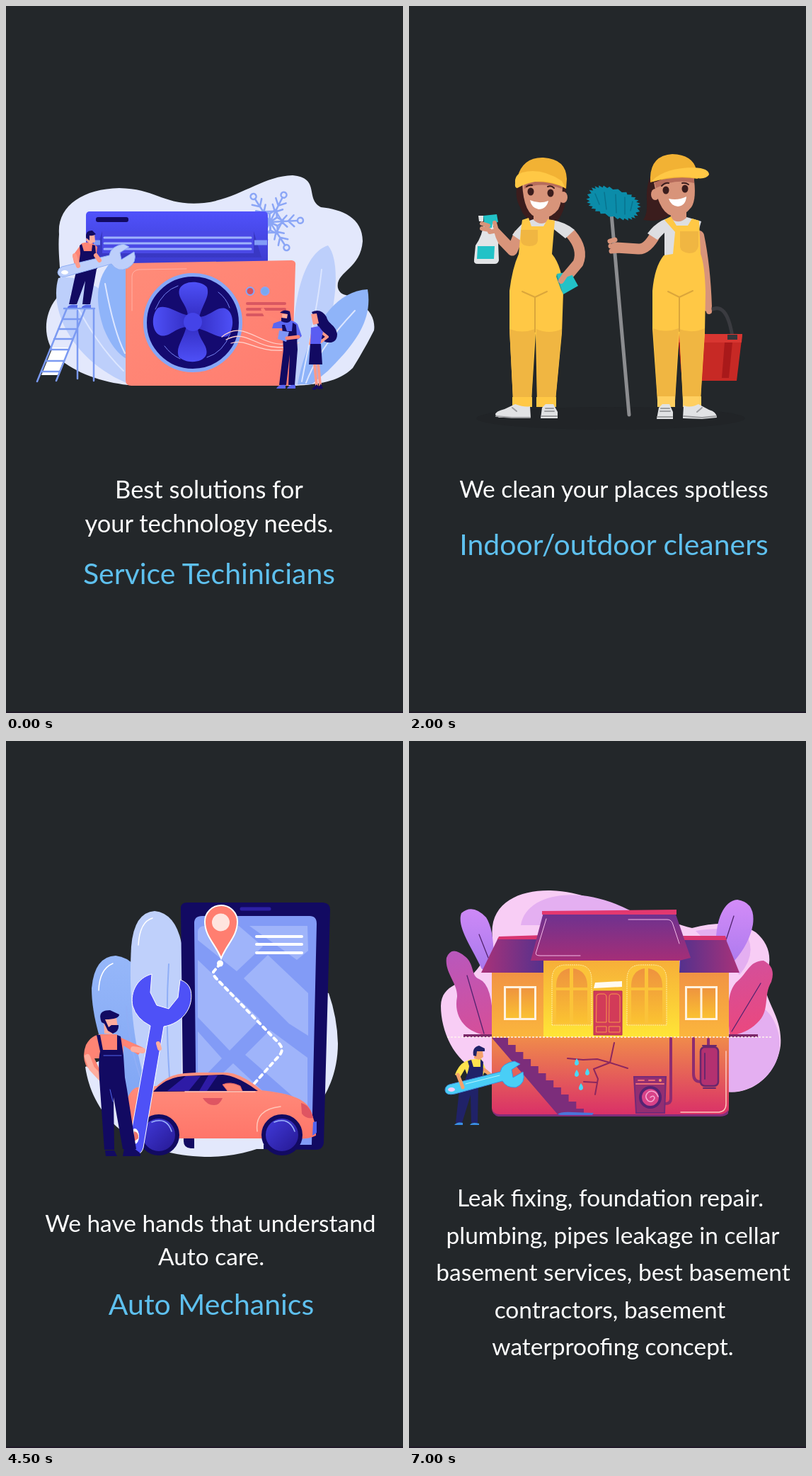
Animation of 561 by 998 pixels, one loop 8 s. Source, as an HTML page:

```html
<!DOCTYPE html>
<html lang="en">
<head>
<meta charset="utf-8">
<title>Home services</title>
<style>
html, body { margin: 0; width: 100%; height: 100%; overflow: hidden; background: #23272a; }
svg { display: block; width: 100%; height: 100%; }
.scene { opacity: 0; }
.scene:first-of-type { opacity: 1; }
text { font: 33.5px Lato, "Open Sans", sans-serif; fill: #fff; text-anchor: middle; }
.mid { font-size: 34.5px; }
.big { font-size: 41px; fill: #5ec0ee; }
.ln { fill: none; stroke-linecap: round; stroke-linejoin: round; }
.white { stroke: #fff; }
.navy { fill: #120a62; }
.coral { fill: #ff8474; }
.skin { fill: #d8947a; }
.arm { stroke: #d8947a; }
.sun { fill: #ffc845; }
.sun2 { fill: #f0b642; }
.cloth { fill: #dddee1; }
</style>
</head>
<body>
<svg viewBox="0 0 561 998" preserveAspectRatio="none">
<defs id="defs"></defs>
<rect width="561" height="998" fill="#23272a"/>
<path d="M0 997H561" stroke="#1f1928" stroke-width="2"/>

<g class="scene">
  <path fill="#e3e8fc" d="M75 322C72 283 108 258 160 257C215 258 222 283 280 278C330 272 362 240 405 239C445 243 422 272 445 284C475 287 504 299 504 332C501 372 465 375 469 398C474 414 489 403 500 420C517 430 522 446 520 458C510 478 497 500 490 511C470 531 440 534 410 536L172 535C137 531 98 519 72 495C52 472 52 437 71 413C83 392 72 360 75 322Z"/>
  <g id="flake" class="ln" stroke="#8ba6f6" stroke-width="2.5" transform="translate(373 305)"></g>
  <path fill="#bdcffb" d="M406 465C408 405 423 348 455 338C475 362 466 440 440 500L415 535H400Z"/>
  <path fill="#8fb4f9" d="M412 534C425 465 460 402 511 400C519 445 490 480 455 515L432 534Z"/>
  <path class="ln" stroke="#dce6ff" stroke-width="2" d="M446 372C440 430 428 475 418 530M493 430C465 460 440 490 424 532"/>
  <path fill="#bdcffb" d="M74 384C60 430 95 500 170 532V440C143 395 100 379 74 384Z"/>
  <path fill="#8fb4f9" d="M148 362C126 385 126 420 138 455C148 480 160 492 170 498V372Z"/>
  <path class="ln" stroke="#dce6ff" stroke-width="2" d="M140 392C147 430 155 465 168 490M92 407C112 450 140 490 166 515"/>

  <rect x="113" y="290" width="257" height="74" rx="5" fill="url(#unit)"/>
  <path fill="#3938c4" d="M136 318H350L361 355H124Z"/>
  <path fill="#4a49e6" d="M136 318H350V349H136Z"/>
  <path class="ln" stroke="#9fb3fc" stroke-width="3" d="M139 327H346M139 335H346M139 343H346"/>
  <path stroke="#829cf7" stroke-width="7" d="M124 334H133M351 334H369"/>
  <rect class="navy" x="127" y="298" width="46" height="7" rx="3"/>
  <path fill="url(#box)" d="M169 366Q170 363 176 363L404 359Q410 360 409 366L404 530Q403 536 396 536H177Q169 536 169 528Z"/>
  <path class="ln" stroke="#ffb1a5" d="M178 430V381Q179 373 188 372L255 371"/>
  <circle cx="264" cy="447" r="67.500" fill="#140a70" stroke="#86a6f7" stroke-width="5"/>
  <g fill="url(#blade)" id="fan"></g>
  <circle cx="264" cy="446" r="13" fill="#4443e8"/>
  <path class="ln" stroke="#7685f2" d="M211 428Q222 402 243 395M317 462Q307 489 284 496M224 480Q233 492 246 498M300 404Q311 412 316 426"/>
  <g stroke="#86a6f7" stroke-width="2"><circle cx="345" cy="402.500" r="5.500" fill="#d6505b"/><circle cx="366" cy="402.500" r="5.500" fill="#78a9ef"/></g>
  <path class="ln" stroke="#d95761" stroke-width="4" d="M341 420H394M341 428H394M341 436H363"/>
  <path class="ln" stroke="#ffd4ce" stroke-width="1.300" d="M305 467C330 447 347 466 372 474S397 474 418 466M311 471C337 457 350 478 376 481S404 480 414 475M318 476C341 469 352 488 390 486"/>

  <g class="ln" stroke="#7b9af2" stroke-width="2.500">
    <path fill="#fff" stroke="none" d="M66 482H89L73 521H50Z"/>
    <path d="M82 427H125M86 427L44 530M112 427L71 529M101 430V526M124 427V529M80 442H105M74 456H100M68 470H94M62 485H89M56 501H82M50 516H76"/>
  </g>
  <path class="navy" d="M101 366H129L119 421H108L112 388L100 421H89Z"/>
  <path fill="#5369e9" d="M87 425Q90 420 101 422V426H87ZM107 425Q111 420 120 422V426H107Z"/>
  <path class="coral" d="M107 335Q120 331 129 340L127 358H104L106 365L98 370L94 353Z"/>
  <path class="navy" d="M107 336L110 346H121L122 337L126 338L129 371H102L105 349L104 338Z"/>
  <path fill="#ffad9e" d="M115 321H125L126 333L119 336L113 331Z"/>
  <path class="navy" d="M113 327Q112 316 122 317L127 322Q123 325 118 324V331Z"/>
  <path fill="#bdcffb" stroke="#90aff5" d="M79 368L146 352Q148 339 166 336L174 340L161 348L163 358L181 347Q186 362 172 370Q158 377 149 364L84 382Q74 384 73 376Q74 370 79 368Z"/>
  <ellipse cx="83" cy="376" rx="5" ry="3" fill="#fff"/>
  <path class="ln" stroke="#ff9a89" stroke-width="6" d="M97 352L102 367M127 352L132 359"/>

  <path class="coral" d="M379 448Q363 441 360 427L364 426L370 435L386 444Z"/>
  <path fill="#5a66f2" d="M378 448Q401 438 412 449L418 466L411 472H390L391 455L376 455Z"/>
  <path class="navy" d="M390 450H394L397 459H404L405 447L410 450L412 485L408 535H399L401 492L396 535H386L392 485Z"/>
  <path fill="#7f96f6" d="M386 458L400 460L396 474L384 470Z"/>
  <path class="ln" stroke="#ff8474" stroke-width="5" d="M413 467L397 469"/>
  <path fill="#ffad9e" d="M390 435H401L400 446H391Z"/>
  <path class="navy" d="M387 433Q393 427 401 431L403 443Q399 450 389 445V440L397 441L398 435Z"/>
  <path fill="#5a66f2" d="M382 540Q385 534 395 535V540ZM397 540Q400 534 409 535V540Z"/>
  <path class="navy" d="M432 432Q445 426 453 439C455 449 466 450 468 463Q468 476 455 475C440 473 443 455 440 450Z"/>
  <path class="ln" stroke="#ff9a89" stroke-width="4" d="M436 505L439 535M441 505L444 535M434 457L430 477M444 459L454 467L445 474"/>
  <path fill="#ff9a89" d="M431 435L439 434L442 448L434 450Z"/>
  <path fill="#5a5df2" d="M431 454L442 452L448 460L444 478H430Z"/>
  <path class="navy" d="M430 477H445L447 506H428ZM432 541L439 534L442 538L436 542ZM440 541L445 533L448 540Z"/>
  <text class="mid" x="287" y="695">Best solutions for</text><text class="mid" x="287" y="743">your technology needs.</text>
  <text class="big" x="287" y="816">Service Techinicians</text>
</g>

<g class="scene">
  <ellipse cx="285" cy="582" rx="190" ry="16" fill="#212427"/>
  <path fill="#3b1d1d" d="M155 245Q147 268 158 286Q163 302 180 305H208Q225 287 221 250Z"/>
  <path class="ln arm" stroke-width="15" d="M155 323L146 345L121 319M229 322Q247 343 239 363L223 382"/>
  <path class="cloth" d="M176 301L161 306Q152 315 146 323L159 332L163 324V358H202V313L221 328L234 316Q221 305 202 302Z"/>
  <path class="skin" d="M176 290H198V302Q187 312 176 302Z"/>
  <path class="skin" d="M160 250L216 243Q219 270 211 287Q199 302 183 299Q162 296 160 250Z"/>
  <ellipse class="skin" cx="218" cy="270" rx="6" ry="8"/>
  <path fill="#b66c5c" d="M163 252Q187 240 216 251V258Q186 247 163 258Z"/>
  <path fill="#f2b234" d="M153 242Q161 213 190 214Q222 216 223 244L222 258Q200 245 157 249Z"/>
  <path class="sun" d="M150 250Q149 238 160 235Q187 228 216 247L221 257Q186 238 153 257Q149 257 150 250Z"/>
  <g fill="#3b1d1d"><ellipse cx="172" cy="262" rx="4.500" ry="5.500"/><ellipse cx="200" cy="264" rx="4.500" ry="5.500"/></g>
  <path class="ln" stroke="#3b1d1d" stroke-width="2" d="M166 255Q170 252 174 253M196 255Q201 253 205 257"/>
  <path fill="#fff" d="M171 274Q184 280 197 275Q194 287 183 287Q173 285 171 274Z"/>
  <path class="sun" d="M160 302L169 299L173 311H190L196 301L206 303L202 350Q217 368 218 404L216 462L207 557H181L179 462L173 557H147L142 456V402Q146 370 155 350L158 317Z"/>
  <path class="sun2" d="M158 316H182V331Q181 339 170 339Q158 338 158 331ZM142 456Q160 463 178 456L173 554H147ZM180 456Q198 464 216 456L207 554H181Z"/>
  <path class="ln" stroke="#dba63b" stroke-width="2" d="M160 403L178 411L195 403M178 412V460"/>
  <path class="sun" d="M146 552H174V566H146ZM180 552H208V566H180Z"/>
  <path fill="#e1e2e4" d="M122 577Q122 572 135 569L150 562Q164 567 171 565L172 581H127ZM188 567L193 562H204L210 573V582H186Z"/>
  <path class="ln" stroke="#9c9da0" stroke-width="2" d="M123 579L145 581H171M187 579H209M146 567L152 572M193 568H204M192 572H205"/>
  <path fill="#e2e4e6" d="M106 304H119Q118 319 126 334L127 359Q126 364 121 364H97Q91 364 92 358L94 338Q104 324 106 304Z"/>
  <path fill="#22c2c7" d="M97 339H121L120 357H96ZM105 296L124 294L126 305L118 307L117 313H107Z"/>
  <path fill="#e2e4e6" d="M98 296H105V304H99Z"/>
  <path class="ln arm" stroke-width="6" d="M103 307L112 310M103 314L113 316M121 306L124 317L114 319"/>
  <path fill="#22c2c7" d="M209 378L228 375L239 395L218 407Z"/>
  <path fill="#159ba4" d="M209 378L218 407L215 401L208 382Z"/>
  <path class="ln arm" stroke-width="8" d="M232 375L221 379L215 388"/>

  <path class="ln" stroke="#3a3b40" stroke-width="5" d="M425 430Q449 415 457 467"/>
  <path fill="#c72925" d="M380 463H471L463 529H386Z"/>
  <path fill="#a9191a" d="M381 474H412V530H386ZM446 475H457L452 525H442Z"/>
  <path fill="#d83631" d="M380 463H471L470 475H380Z"/>
  <path fill="#35363b" d="M450 464H464V471H450Z"/>
  <path class="ln arm" stroke-width="14" d="M410 324Q419 367 421 424"/>
  <path class="ln arm" stroke-width="8" d="M422 420L424 431"/>
  <path fill="#3b1d1d" d="M344 235C328 263 343 285 331 302Q360 306 370 292L365 245Z"/>
  <path d="M286 293L311 577" class="ln" stroke="#8c8d90" stroke-width="5"/>
  <path id="mop" fill="#0b8ca9"/>
  <path class="ln" stroke="#08738e" stroke-width="1.500" d="M263 265L269 280M276 263L279 287M292 266L293 292M305 270L305 294M316 276L313 289"/>
  <path class="ln arm" stroke-width="15" d="M349 321Q337 344 324 343L293 341"/>
  <path class="ln arm" stroke-width="7" d="M284 332L291 330M285 339L295 338M286 346L295 345"/>
  <path class="cloth" d="M369 298L357 303Q346 309 337 321L351 330L361 320V355H402L409 318L413 304L389 297Z"/>
  <path class="skin" d="M370 287H392V299Q381 309 370 300Z"/>
  <path class="skin" d="M346 249L402 239Q407 272 399 284Q389 297 376 297Q354 296 346 249Z"/>
  <ellipse class="skin" cx="348" cy="266" rx="6" ry="8"/>
  <path fill="#b66c5c" d="M347 249Q375 236 403 243V250Q376 243 349 257Z"/>
  <path fill="#f2b234" d="M341 242Q342 211 372 209Q401 210 406 231L408 244Q376 239 341 249Z"/>
  <path class="sun" d="M344 246Q363 228 403 228Q424 229 424 238Q420 245 406 243Q376 237 344 248Z"/>
  <g fill="#3b1d1d"><ellipse cx="363" cy="260" rx="4.500" ry="5.500"/><ellipse cx="390" cy="258" rx="4.500" ry="5.500"/></g>
  <path class="ln" stroke="#3b1d1d" stroke-width="2" d="M357 254Q362 249 367 250M386 250Q391 249 395 252"/>
  <path fill="#fff" d="M367 272Q380 275 392 269Q391 282 380 283Q370 282 367 272Z"/>
  <path class="sun" d="M361 302L370 297L378 310H394L400 300L410 303L412 350Q418 365 419 404L418 462L412 557H387L382 462L376 557H351L344 456V402Q347 368 360 352L373 350L376 319Z"/>
  <path class="sun2" d="M383 318H409V339Q407 349 396 349Q384 348 383 340ZM345 455Q362 462 381 455L376 552H351ZM382 456Q400 463 418 455L412 552H387Z"/>
  <path class="ln" stroke="#dba63b" stroke-width="2" d="M366 403L382 411L401 402M382 412V459"/>
  <path fill="#ffcf61" d="M351 551H376V566H351ZM387 551H413V566H387Z"/>
  <path fill="#e1e2e4" d="M353 567L358 562H368L373 573V583H350ZM388 564Q398 568 409 562L424 570Q435 573 435 581L414 583L387 582Z"/>
  <path class="ln" stroke="#9c9da0" stroke-width="2" d="M351 580H372M388 579L414 581L434 579M356 568H368M355 572H369M407 573L414 567"/>
  <text x="289.500" y="694">We clean your places spotless</text>
  <text class="big" x="289.500" y="775">Indoor/outdoor cleaners</text>
</g>

<g class="scene">
  <path fill="#e3e8fc" d="M112 460C124 540 190 587 289 587C390 585 469 520 469 427Q468 390 456 356L240 300L160 440Z"/>
  <path fill="url(#leafB)" d="M178 520C145 466 121 400 121 349Q125 304 155 303Q188 307 197 353L210 520Z"/>
  <path fill="#bfd0fb" d="M202 500C176 420 174 346 177 290Q181 242 210 240Q239 243 248 285V500Z"/>
  <path class="ln" stroke="#fff" stroke-width="1.500" d="M131 352Q132 322 151 314M187 288Q189 255 207 250"/>
  <path class="ln" stroke="#8faef6" stroke-width="2" d="M170 375Q173 430 195 490M230 315Q225 390 231 475"/>
  <path class="navy" d="M247 236Q247 228 256 228L448 228Q458 229 458 238L449 568Q447 577 438 577L261 575Q251 574 251 565Z"/>
  <path class="ln" stroke="#2d20a5" stroke-width="5" d="M333 237H372"/>
  <path fill="#829bf6" d="M266 257Q266 247 277 247H429Q439 247 439 258L432 570H279Q269 568 269 558Z"/>
  <path fill="#9fb4fa" d="M271 269Q272 261 281 261H329L363 290L326 325L271 281ZM344 261H426L427 296L411 309ZM271 309L359 393L316 437L271 390ZM336 335L370 302L427 356V416L400 399ZM271 410L305 448L271 483ZM271 503L321 455L380 510L360 555H271ZM373 408L426 447V520L338 443Z"/>
  <path class="ln white" stroke-width="4" d="M354 276H418M354 287H418M354 299H418"/>
  <path class="ln white" stroke-width="4" stroke-dasharray="5 6" d="M303 314L293 326Q293 331 297 335L386 427Q393 435 387 443L346 489"/>
  <path fill="#ff7e70" stroke="#fff" stroke-width="2" d="M304 307C297 288 281 276 281 255A23 23 0 0 1 327 255C327 276 311 288 304 307Z"/>
  <circle cx="303.500" cy="256" r="12.500" fill="#ffe4df"/><circle cx="302.500" cy="314" r="4.500" fill="#fff"/>

  <path fill="#e3e8fc" d="M266 560H364V576H266Z"/>
  <path fill="url(#car)" d="M168 535Q167 498 184 489L213 487C231 471 242 469 270 468L313 468Q334 470 361 493C394 497 425 502 432 525L438 545V557Q425 563 407 561H190Z"/>
  <path class="navy" d="M208 495Q225 475 251 473L306 471Q328 473 356 494Z"/>
  <path fill="#2e1ba6" d="M254 473H275L258 494H228ZM286 472H299L284 494H273Z"/>
  <path fill="#ff8573" stroke="#d95d62" d="M306 485Q317 480 331 487L334 494H313Z"/>
  <path fill="#df5562" d="M278 504H306Q302 514 294 514Q284 514 278 504ZM417 511Q430 514 434 532Q424 534 418 526Z"/>
  <path fill="#5265ef" d="M434 538L439 537V553L433 557Z"/>
  <path class="ln" stroke="#ffc6b8" stroke-width="1.500" d="M355 551Q351 520 388 516M253 495H352"/>
  <g stroke="#120a62" stroke-width="6" fill="url(#wheel)"><circle cx="216" cy="556" r="26"/><circle cx="390" cy="556" r="26"/></g>
  <path class="ln" stroke="#9cb4fc" stroke-width="1.500" d="M206 538Q227 530 234 551M379 538Q400 530 408 551"/>
  <path fill="#4e51f7" stroke="#fff" d="M206 329C186 334 175 354 179 374Q184 392 204 402L173 574Q174 583 185 584Q192 582 194 574L223 403C248 399 266 377 261 352Q258 341 246 337L243 362L230 378L213 373L204 355Z"/>
  <ellipse cx="182" cy="558" rx="6" ry="11" fill="#fff"/><path fill="#ed756e" d="M181 551Q188 552 187 561L180 566Z"/>
  <path class="coral" d="M136 414Q121 414 113 429Q107 444 113 458L133 479L137 474L125 448H165L166 430L187 443L194 433L163 419L156 414Z"/>
  <path class="ln" stroke="#ffad9e" stroke-width="8" d="M115 446L121 462L134 476M180 435L193 437"/>
  <path class="ln" stroke="#ffad9e" stroke-width="6" d="M215 427L217 434"/>
  <path class="navy" d="M133 415L137 436H157V415L162 417L166 444L168 475L171 492L184 576H165L152 503L153 577H139L132 478Q130 450 133 438L128 415Z"/>
  <path class="ln" stroke="#5167ee" d="M138 444H163M147 492L151 509"/>
  <path fill="#ffad9e" d="M138 391H156L158 404L150 414L139 413Z"/>
  <path class="navy" d="M135 397Q128 380 147 380L160 386Q160 393 140 393L145 404L149 401L159 401Q160 410 151 413L144 409L139 399ZM140 578H153L157 586H141ZM167 575H181L190 582V586H165Z"/>
  <text x="289" y="693">We have hands that understand</text><text x="290" y="740">Auto care.</text>
  <text class="big" x="290" y="810">Auto Mechanics</text>
</g>

<g class="scene">
  <path fill="#f8cdf5" d="M118 279C112 228 156 210 200 211C255 213 275 235 312 239C352 242 365 256 400 264Q457 249 490 270Q516 292 507 325C492 363 529 381 525 430C520 470 485 500 449 495L118 470C70 467 45 415 45 374C46 341 79 344 92 327Q107 312 118 279Z"/>
  <path fill="#e4aff1" d="M158 260C165 216 238 201 312 239L360 260ZM448 424C460 366 502 355 520 405C538 460 488 500 449 495ZM405 268Q462 259 480 280Q489 305 467 330Z"/>
  <path fill="url(#leafP)" d="M103 322C88 290 67 262 74 243Q90 229 109 249Q122 269 119 322ZM436 310C429 270 439 226 464 224Q490 228 486 259Q481 286 460 310Z"/>
  <path fill="url(#leafR)" d="M117 416C83 415 62 392 68 361C69 342 50 327 53 306Q60 288 79 304C93 315 87 331 99 336Q121 345 118 416ZM453 416C450 376 450 355 462 341C480 326 480 311 501 310Q519 319 512 340C500 360 511 381 492 398Q477 413 453 416Z"/>
  <path class="ln" stroke="#52246f" stroke-width="1.300" d="M99 273L112 306M82 331L106 413M459 247L446 287M497 342L456 410"/>
  <path stroke="#7b2868" stroke-width="4" d="M77 416H118M452 416H493"/>
  <path fill="url(#wing)" d="M117 326H190V418H117ZM382 326H452V418H382Z"/>
  <path fill="url(#roofL)" d="M126 278L191 275V327H102Z"/>
  <path fill="url(#roofR)" d="M384 278H447L467 327H382Z"/>
  <path fill="#d83571" d="M127 276L190 274V280H125ZM387 275H447L449 281H388Z"/>
  <path fill="url(#wall)" d="M190 307H382V418H190Z"/>
  <path fill="url(#roof)" d="M190 242H376L398 306L382 310H172Z"/>
  <path fill="#e33870" d="M188 240L378 238V245H188Z"/>
  <path class="ln" stroke="#f4bbe9" d="M194 251L180 297Q177 303 185 303H242M310 252H365Q371 252 373 259L382 286"/>
  <g id="arches"></g>
  <g id="panes" fill="url(#glass)" stroke="#fff2df" stroke-width="3"></g>
  <path fill="#d23b58" stroke="#b12d56" d="M261 353H301V415H261Z"/>
  <path class="ln" stroke="#f7984c" d="M265 360Q265 357 269 357H276Q279 358 279 361V397H265ZM283 361Q283 357 287 357H294Q298 358 298 361V397H283ZM265 403H279V411H265ZM283 403H298V411H283Z"/>
  <path fill="#fffaf0" d="M263 341L301 339V347L261 349Z"/>
  <path fill="url(#cellar)" d="M117 418H452V518Q452 529 441 529H127Q117 528 117 518Z"/>
  <path fill="#812d7b" d="M118 519Q119 527 128 527H441Q448 526 451 521V526Q447 530 439 530H126Q118 528 118 519Z"/>
  <path id="stairs" fill="#7c2d7b"/>
  <path fill="#4b75da" d="M210 527Q214 523 231 524L261 525L259 528H214Z"/>
  <path stroke="#fff5ee" stroke-dasharray="3 2" stroke-width="1.500" d="M54 418H513"/>
  <path class="ln" stroke="#8c275f" stroke-width="2" d="M224 448L246 450L266 449L284 454L290 426M284 454L309 462M284 454L261 463L267 477L263 499M265 482L247 481"/>
  <g fill="#4bd8f5"><path id="drop" d="M237 448Q231 457 237 458Q243 456 237 448Z"/><use href="#drop" x="15" y="14"/><use href="#drop" x="6" y="35"/><use href="#drop" y="16"/></g>
  <path class="ln" stroke="#8d2c70" stroke-width="4" d="M370 420V505Q370 512 362 512M402 420V470Q402 481 412 481M423 421V435"/>
  <path fill="#922e72" stroke="#742a78" stroke-width="2" d="M318 474H363L361 525H321Z"/>
  <path class="ln" stroke="#ed6d75" stroke-width="2" d="M321 484H360M324 479H332M339 479H347"/>
  <circle cx="355" cy="479" r="2" fill="#ff9b61"/>
  <circle cx="341" cy="503" r="14" fill="#d84288" stroke="#552373" stroke-width="4"/>
  <path class="ln" stroke="#f6a9d4" stroke-width="1.500" d="M341 503Q346 499 347 504Q345 511 338 508Q331 501 339 495Q348 492 352 502"/>
  <rect x="412" y="432" width="25" height="55" rx="6" fill="#b33170" stroke="#68276d" stroke-width="2.500"/>
  <path class="ln" stroke="#68276d" stroke-width="2" d="M418 441V477M415 430H434M416 490H433"/>
  <path class="ln" stroke="#ffc7bb" stroke-width="1.500" d="M384 524H438Q448 523 448 512V438"/>

  <path fill="#202268" d="M72 484H98L97 539H88L87 500L75 539H66Z"/>
  <path fill="#3a8fe5" d="M64 542Q68 537 76 539V542ZM86 542Q89 537 99 540V542Z"/>
  <path fill="#ffe34d" d="M85 450L102 448L108 462L103 478H85L79 463L72 475L65 471Q71 454 85 450Z"/>
  <path class="ln" stroke="#f4a16b" stroke-width="5" d="M69 471L74 484M106 464L116 472"/>
  <path fill="#202268" d="M88 450L91 460H101L101 449L105 453L104 489H73Q82 476 85 459L83 452Z"/>
  <path fill="#f4a16b" d="M93 437H104L105 446L99 450L92 448Z"/>
  <path fill="#202268" d="M91 444Q89 432 99 430L107 434V438H96L95 445Z"/>
  <path fill="#49cef6" stroke="#3d91df" d="M57 485L129 467Q131 455 149 452L157 456L145 464L147 475L161 467Q166 483 151 489Q138 490 132 480L65 498Q52 501 51 493Q51 487 57 485Z"/>
  <path class="ln" stroke="#b9f4ff" d="M80 484L128 472"/>
  <ellipse cx="60" cy="492" rx="5" ry="3" fill="#f8cdf5"/>
  <path class="ln" stroke="#f4a16b" stroke-width="5" d="M73 481L76 489"/>
  <text x="284.500" y="657">Leak fixing, foundation repair.</text><text x="288" y="710">plumbing, pipes leakage in cellar</text><text x="288.500" y="762">basement services, best basement</text><text x="284" y="815">contractors, basement</text><text x="288" y="867">waterproofing concept.</text>
</g>
</svg>
<script>
const $ = id => document.getElementById(id);
const fill = (id, items) => { $(id).innerHTML = items.join(''); };
const turns = n => [...Array(n).keys()].map(i => i * 360 / n);

// id, direction, start colour, end colour
const shades = [
  ['unit', 0, 1, '#5052fb', '#3c3bcf'], ['box', 1, 1, '#ff8c79', '#ff7d70'],
  ['blade', 0, 1, '#4e50f7', '#3029bd'], ['leafB', 0, 1, '#96b7f9', '#7fa5f4'],
  ['car', 0, 1, '#ff917f', '#ff7569'], ['wheel', 1, 1, '#433de0', '#24168e'],
  ['leafP', 0, 1, '#d38cf8', '#a979ed'], ['leafR', 1, 1, '#b858bd', '#ed477b'],
  ['wing', 0, 1, '#f19344', '#fbb63d'], ['wall', 0, 1, '#f6ad39', '#ffe536'],
  ['roof', 0, 1, '#6c3290', '#a52e77'], ['roofL', 1, 0, '#a93279', '#54318d'],
  ['roofR', 1, 0, '#54318d', '#a93279'], ['glass', 0, 1, '#ee923f', '#fbc331'],
  ['cellar', 0, 1, '#f08b4b', '#d92f68']
];
fill('defs', shades.map(([id, x, y, a, b]) =>
  `<linearGradient id="${id}" x2="${x}" y2="${y}"><stop stop-color="${a}"/><stop offset="1" stop-color="${b}"/></linearGradient>`));

fill('flake', turns(6).map(a => `<g transform="rotate(${a + 27})">
  <path d="M0 0V-39M-8 -34L0 -26L8 -34M-8 -24L0 -16L8 -24M0 -20L6 -10L0 0L-6 -10Z"/>
  <circle cy="-43" r="4"/><path d="M0 -17L15 -9" transform="rotate(3)"/></g>`));

fill('fan', turns(4).map(a =>
  `<path transform="rotate(${a} 264 446)" d="M256 447C262 424 241 415 245 400C250 387 275 387 284 397C289 411 276 422 272 444Z"/>`));

fill('arches', [202, 308].map(x => `<g transform="translate(${x} 316)">
  <path d="M0 85V21Q0 0 20 0H36Q56 0 56 21V85Z" fill="#fbc339" stroke="#fff0a8" stroke-dasharray="2 1"/>
  <path d="M6 82V28Q7 8 25 5V82ZM30 82V5Q49 8 50 28V82Z" fill="url(#glass)"/>
  <path d="M6 34H50" stroke="#fbc339" stroke-width="4"/></g>`));

fill('panes', [135.5, 391.5].map(x => `<path d="M${x} 347.5h43v45h-43zM${x + 21.5} 347v46"/>`));

$('stairs').setAttribute('d', 'M117 419H140' + 'v10h10.7'.repeat(10) + 'V527H210Z');

// Ragged oval, tilted by 18 degrees
const tilt = 18 * Math.PI / 180, tufts = 56;
$('mop').setAttribute('d', 'M' + [...Array(tufts).keys()].map(i => {
  const a = i * 2 * Math.PI / tufts, r = i % 2 ? 0.9 : 1.03;
  const u = 38 * r * Math.sign(Math.cos(a)) * Math.abs(Math.cos(a)) ** 0.75;
  const v = 20 * r * Math.sign(Math.sin(a)) * Math.abs(Math.sin(a)) ** 0.75;
  return [289 + u * Math.cos(tilt) - v * Math.sin(tilt), 278 + u * Math.sin(tilt) + v * Math.cos(tilt)].map(n => n.toFixed(1));
}).join('L') + 'Z');

// Scene i shows from cuts[i] until the next cut
const cuts = [0, 500, 3000, 5500, 8000], loop = 8000;
document.querySelectorAll('.scene').forEach((scene, i) => {
  scene.animate(
    cuts.map((t, k) => ({ opacity: k === i ? 1 : 0, offset: t / loop, easing: 'step-end' })),
    { duration: loop, iterations: Infinity });
});
</script>
</body>
</html>
```
